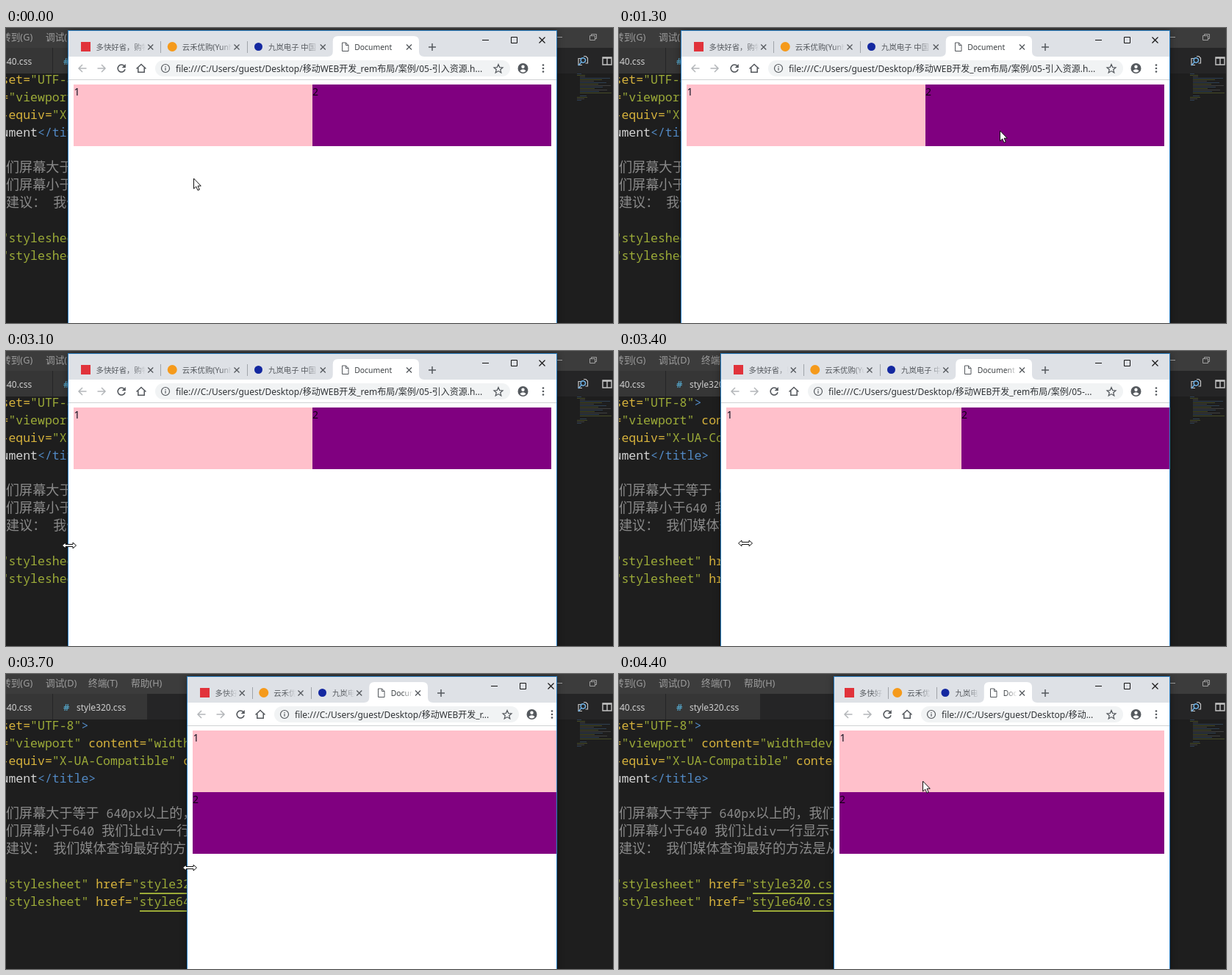
An HTML page with a canvas for the animation above (5.5 s loop, 826 px wide and 402 px high).

```html
<!DOCTYPE html>
<html lang="zh-CN">
<head>
<meta charset="utf-8">
<title>Responsive layout demo</title>
<style>
  html, body { margin: 0; width: 100%; height: 100%; overflow: hidden; background: #1e1e1e; }
  canvas { display: block; }
</style>
</head>
<body>
<canvas id="stage" width="826" height="402"></canvas>
<script>
const ctx = document.getElementById('stage').getContext('2d');
const LOOP = 5500, TICK = 100, RIGHT = 749, BREAKPOINT = 512;
const SANS = '"Noto Sans", "Noto Sans CJK SC", "Noto Sans CJK", sans-serif';
const CJK = '"Noto Sans CJK SC", "Noto Sans CJK", sans-serif';
const MONO = '"Noto Sans Mono", monospace';
const GOLD = '#d6b23c', GREEN = '#9cab38', BLUE = '#5289c4', WHITE = '#d4d4d4', GREY = '#8a8a8a';
const STRIP = '#dee1e6', INK = '#54585d';

// tick, tip x, tip y, resize shape
const pointer = [
  [0, 255, 205], [1, 171, 240], [2, 109, 254], [3, 95, 257], [4, 128, 203], [5, 212, 45],
  [6, 296, 139], [7, 360, 135], [8, 440, 133], [9, 494, 131], [10, 430, 132], [11, 346, 132],
  [13, 518, 140], [25, 234, 272], [26, 128, 266], [27, 112, 264], [28, 100, 262], [29, 92, 261],
  [30, 87, 260], [31, 86, 265, 1], [33, 120, 263, 1], [34, 172, 262, 1], [35, 205, 263, 1],
  [36, 225, 264, 1], [37, 250, 264, 1], [38, 264, 264, 1], [39, 289, 264, 1], [40, 294, 264, 1],
  [41, 293, 264], [42, 325, 225], [43, 380, 170], [44, 413, 146]
];
// tick, left edge, lag of the right-hand controls, right edge of the page
const resize = [
  [0, 85, 0, 742], [33, 110, 0, 750], [34, 139, 0, 786], [35, 180, 22, 782], [36, 219, 26, 768],
  [37, 247, 12, 756], [38, 262, 8, 753], [39, 283, 4, 750], [40, 293, 0, 742]
];
const at = (keys, tick) => keys.filter(k => k[0] <= tick).pop();

const tabs = ['多快好省，购物', '云禾优购(Yunhe)', '九岚电子 中国', 'Document'];
const url = 'file:///C:/Users/guest/Desktop/移动WEB开发_rem布局/案例/05-引入资源.html';
const code = [
  [70, 'set=', GOLD, '"UTF-8"', GREEN, '>', BLUE],
  [94, '=', GOLD, '"viewport"', GREEN, ' content=', GOLD, '"width=devi', GREEN],
  [118, '-equiv=', GOLD, '"X-UA-Compatible"', GREEN, ' conten', GOLD],
  [142, 'ument', WHITE, '</title>', BLUE],
  [286, '"stylesheet"', GREEN, ' href=', GOLD, '"style320.css', GREEN],
  [310, '"stylesheet"', GREEN, ' href=', GOLD, '"style640.css', GREEN]
];
const comments = [
  [190, '们屏幕大于等于 640px以上的，我们'],
  [214, '们屏幕小于640 我们让div一行显示一'],
  [238, '建议： 我们媒体查询最好的方法是从']
];

function rect(x, y, w, h, color) {
  ctx.fillStyle = color;
  ctx.fillRect(x, y, w, h);
}
function text(str, x, y, size, color, family = SANS, weight = '') {
  ctx.font = `${weight} ${size}px ${family}`;
  ctx.fillStyle = color;
  ctx.fillText(str, x, y);
  return x + ctx.measureText(str).width;
}
function disc(x, y, r, color) {
  ctx.beginPath();
  ctx.arc(x, y, r, 0, 7);
  ctx.fillStyle = color;
  ctx.fill();
}
// SVG path drawn at an offset
function shape(d, x, y, stroke, width = 1, fill) {
  ctx.save();
  ctx.translate(x, y);
  const p = new Path2D(d);
  if (fill) { ctx.fillStyle = fill; ctx.fill(p); }
  if (stroke) { ctx.strokeStyle = stroke; ctx.lineWidth = width; ctx.stroke(p); }
  ctx.restore();
}
const cross = (x, y, r, color, width) =>
  shape(`M${-r} ${-r}L${r} ${r}M${r} ${-r}L${-r} ${r}`, x, y, color, width);

function drawEditor() {
  rect(0, 0, 826, 402, '#1e1e1e');
  rect(0, 0, 826, 27, '#3c3c3c');
  [['转到(G)', -6], ['调试(D)', 54], ['终端(T)', 112], ['帮助(H)', 170]]
    .forEach(([label, x]) => text(label, x, 17, 12.7, '#9d9d9d'));
  rect(749, 12, 8, 1, '#a0a0a0');
  shape('M-4.5 -1.5h7v6h-7zM-2.5 -1.5v-2h7v6h-2', 799, 12, '#a0a0a0');

  rect(0, 27, 826, 35, '#252526');
  rect(0, 27, 63, 35, '#363636');
  rect(64, 27, 128, 35, '#363636');
  text('style640.css', -32, 50, 12, '#d0d0d0');
  text('#', 78, 50, 13, '#519aba', SANS, 'bold');
  text('style320.css', 96, 50, 12, '#d0d0d0');
  shape('M-1 5.5h-5v-9h4M1 -6.5h3l2.5 2.5v7h-3', 785, 45, '#c5c5c5', 1.2);
  shape('M3.5 -1a3.2 3.2 0 1 1 -6.4 0a3.2 3.2 0 1 1 6.4 0M-2 1.5l-4 4.5', 785, 45, '#6fb3e8', 1.5);
  shape('M-6 -5h12v10h-12zM0 -5v10M-6 -4h12', 818, 45, '#c5c5c5', 1.4);

  for (const [y, ...runs] of code) {
    let x = -6.5;
    for (let i = 0; i < runs.length; i += 2) x = text(runs[i], x, y + 6, 16.5, runs[i + 1], MONO, 500);
  }
  rect(182, 298, 121, 2, GREEN);
  rect(182, 322, 121, 2, GREEN);
  for (const [y, line] of comments) {
    let x = 0;
    for (const run of line.match(/[\x20-\x7e]+|[^\x20-\x7e]+/g)) {
      const latin = run < '\x7f';
      x = text(run, x, y + 6, latin ? 16.5 : 18.1, GREY, latin ? MONO : CJK, latin ? 500 : 400);
    }
  }

  ctx.globalAlpha = 0.32;
  for (let i = 0; i < 19; i++) {
    const indent = i < 2 || i > 15 ? 0 : 4;
    const width = i < 3 || i > 13 ? 6 + i * 5 % 9 : 18 + i * 17 % 28;
    if (i !== 14) rect(777 + indent, 62 + i * 2, width, 1, [BLUE, GREEN, GREY][i % 3]);
  }
  ctx.globalAlpha = 1;
}

function drawTabs(left, lag) {
  const first = left + 8, w = (562 + lag - first) / 4, pad = w < 67 ? 12.5 : 16;
  tabs.forEach((title, i) => {
    const x = first + i * w, end = x + w, icon = x + pad, active = i === 3;
    if (active) {
      shape(`M-7 28q7 0 7 -7V7q0 -7 7 -7H${w - 7}q7 0 7 7V21q0 7 7 7z`, x, 11, null, 0, '#fff');
    } else if (i < 2) {
      rect(Math.round(end), 18, 1, 16, '#a0a4a9');
    }
    const closable = active || w > (i ? 70 : 66);
    const limit = end - (closable ? 20 : 7);
    ctx.save();
    ctx.beginPath();
    ctx.rect(x, 11, limit - x, 28);
    ctx.clip();
    const fade = ctx.createLinearGradient(limit - 16, 0, limit, 0);
    const ink = active ? '60,64,67' : '84,88,93';
    fade.addColorStop(0, `rgba(${ink},1)`);
    fade.addColorStop(1, `rgba(${ink},0)`);
    text(title, icon + 13.5, 30, 10.4, fade);
    ctx.restore();

    if (i === 0) rect(Math.round(icon - 7), 19, 13, 13, '#e1333b');
    if (i === 1) disc(icon, 25.5, 6.5, '#f59a1b');
    if (i === 2) disc(icon, 25.5, 5.5, '#1428a0');
    if (active) shape('M-4 -5.5h5l3.5 3.5v8h-8.5zM1 -5.5v3.5h3.5', Math.round(icon) + 0.5, 25.5, INK);
    if (closable) cross(end - 13.5, 26, 3.5, INK, 1.3);
  });
  shape('M-5 0h10M0 -5v10', 580 + lag, 26, INK, 1.5);
}

function drawToolbar(left, lag) {
  rect(left, 39, RIGHT - left, 32, '#fff');
  rect(left, 70, RIGHT - left, 1, '#d0d2d4');
  shape('M5.5 0h-10.5M0 -5l-5 5l5 5', left + 19, 55, '#b4b7ba', 1.5);
  shape('M-5.5 0h10.5M0 -5l5 5l-5 5', left + 45, 55, '#b4b7ba', 1.5);
  shape('M4 -3.2A5 5 0 1 0 5 1.2', left + 72, 55, INK, 1.6);
  shape('M5.8 -6v5.2h-5.2z', left + 72, 55, null, 0, INK);
  shape('M-6.5 0.5L0 -5.5L6.5 0.5M-4.2 -1v6.2h8.4v-6.2', left + 99, 55, INK, 1.5);

  ctx.beginPath();
  ctx.roundRect(left + 118, 44, 568 + lag - left, 22, 11);
  ctx.fillStyle = '#f1f3f4';
  ctx.fill();
  shape('M5.5 0a5.5 5.5 0 1 1 -11 0a5.5 5.5 0 1 1 11 0M0 -0.8v3.6M0 -3v1.3', left + 132, 55, INK, 1.2);

  const x = left + 146;
  let shown = url.length;
  ctx.font = `12px ${SANS}`;
  while (x + ctx.measureText(url.slice(0, shown) + '...').width > 648.8 + lag) shown--;
  text(url.slice(0, shown) + '...', x, 59.5, 12, '#303336');

  shape('M0 -6l1.7 4.1l4.3 .3l-3.3 2.8l1.1 4.3l-3.8 -2.4l-3.8 2.4l1.1 -4.3l-3.3 -2.8l4.3 -.3z',
    670 + lag, 55.5, INK, 1.2);
  disc(703.5 + lag, 55, 7, INK);
  disc(703.5 + lag, 52.7, 2.2, '#fff');
  shape('M-4.2 3.3q4.2 -4.2 8.4 0q-4.2 4.4 -8.4 0z', 703.5 + lag, 55, null, 0, '#fff');
  for (const y of [50.5, 55, 59.5]) disc(731 + lag, y, 1.3, INK);
}

function drawPage(left, right) {
  const x = left + 7, width = right - x, half = Math.round(width / 2);
  const stacked = width < BREAKPOINT;
  const [x2, y2] = stacked ? [x, 161] : [x + half, 77];
  rect(x, 77, stacked ? width : half, 84, '#ffc0cb');
  rect(x2, y2, right - x2, 84, '#800080');
  text('1', x + 0.5, 92, 14, '#101020');
  text('2', x2, y2 + 15, 14, '#140014');
}

function drawBrowser([, left, lag, pageRight]) {
  ctx.save();
  ctx.shadowColor = 'rgba(0,0,0,.45)';
  ctx.shadowBlur = 10;
  rect(left, 4, RIGHT - left, 410, '#fff');
  ctx.restore();

  ctx.save();
  ctx.beginPath();
  ctx.rect(left, 4, RIGHT - left, 398);
  ctx.clip();
  rect(left, 4, RIGHT - left, 35, STRIP);
  drawTabs(left, lag);
  rect(648 + lag, 16, 9, 1, '#111');
  shape('M-4 -4h8v8h-8z', 691.5 + lag, 16.5, '#111');
  cross(729.5 + lag, 16.5, 4, '#111', 1.1);
  drawToolbar(left, lag);
  drawPage(left, pageRight);
  ctx.restore();

  ctx.strokeStyle = '#2b7fc3';
  ctx.lineWidth = 1;
  ctx.strokeRect(left - 0.5, 3.5, RIGHT - left + 1, 410);
}

function drawPointer([, x, y, sizing]) {
  if (sizing) {
    shape('M-9.5 0l4.5 -4v2.5h10v-2.5l4.5 4l-4.5 4v-2.5h-10v2.5z', x, y, '#111', 1, '#fff');
  } else {
    shape('M0 0V14L3.2 11L5.5 16.2L7.8 15.2L5.6 10.2H9.8Z', x + 0.5, y, '#111', 1, '#fff');
  }
}

function render(now) {
  const tick = Math.floor(now % LOOP / TICK);
  drawEditor();
  drawBrowser(at(resize, tick));
  drawPointer(at(pointer, tick));
}

const start = performance.now();
function loop() {
  render(performance.now() - start);
  requestAnimationFrame(loop);
}
loop();
</script>
</body>
</html>
```
